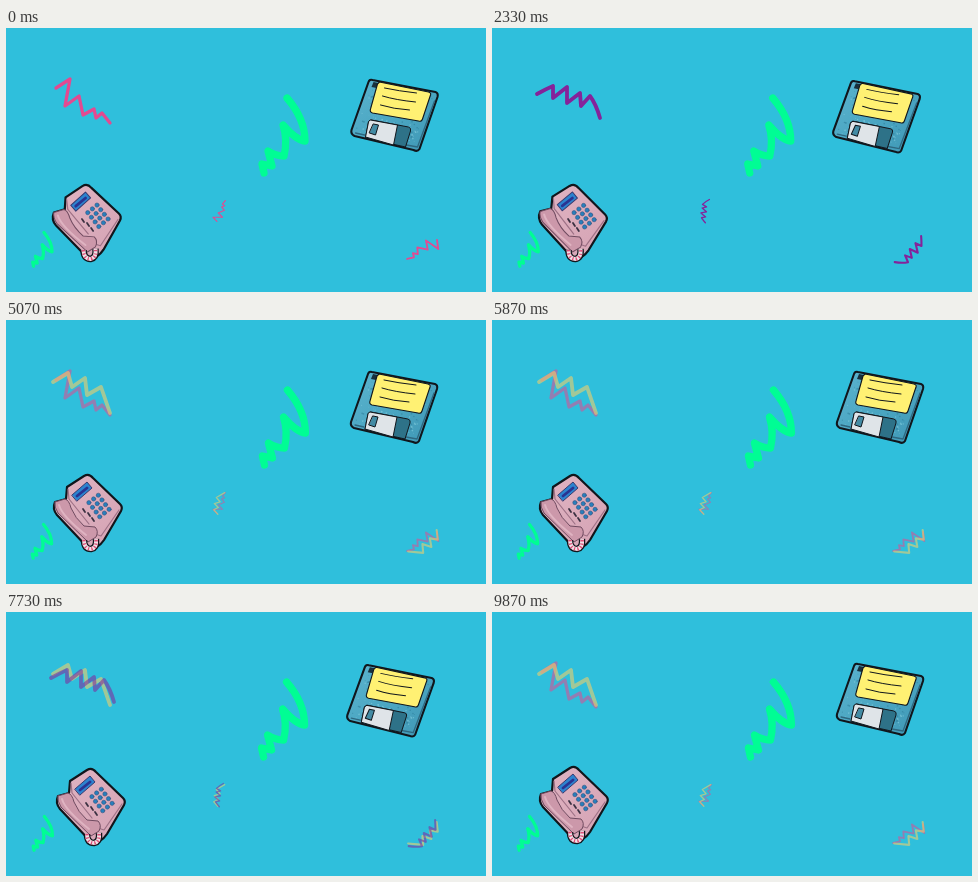
These frames come from a looping animation (480x264 px, 9.94 s). An HTML page:

```html
<!DOCTYPE html>
<html lang="en">
<head>
<meta charset="utf-8">
<title>Retro wiggle</title>
<style>
  html, body { margin: 0; width: 100%; height: 100%; overflow: hidden; background: #2fbfdc; }
  svg { display: block; width: 100vw; height: 100vh; }
  path, circle { stroke-linecap: round; stroke-linejoin: round; }
  #coil path { fill: none; stroke-linecap: butt; }
</style>
</head>
<body>
<svg viewBox="0 0 480 264">
  <defs>
    <linearGradient id="shell" x2="1" y2="1">
      <stop stop-color="#5bb4cf"/><stop offset=".55" stop-color="#4aa5c1"/><stop offset="1" stop-color="#3f97b5"/>
    </linearGradient>
    <linearGradient id="plastic" x2="1" y2="1">
      <stop stop-color="#e0b4c2"/><stop offset="1" stop-color="#d5a3b4"/>
    </linearGradient>
    <path id="zigzag" fill="none" stroke="#00fd94" stroke-width="7.3"
      d="M281 70Q299 91 299 113Q290 112 277 97Q282 112 278 128Q270 128 262 123L266 138L256 136L258 145"/>
    <g id="squiggles" fill="none" stroke-width="3.8">
      <path class="pink" stroke="#e34a91" stroke-width="3.3"
        d="M50 60L64 51L59 78L73 68L77 87L88 81L90 90L96 85L104 95"/>
      <path class="yellow" stroke="#ffd061" d="M47 62L62 53L66 67L79 58L81 75L95 67L104 93"/>
      <path class="purple" stroke="#85239a" d="M45 66Q54 61 61 58L61 70L75 59L75 75L88 65L89 78L98 68Q104 76 108 90"/>
    </g>
  </defs>

  <use href="#squiggles"/>
  <use href="#squiggles" transform="translate(215 183) rotate(-101) scale(.35) translate(-77 -77)"/>
  <use href="#squiggles" transform="translate(431 212) rotate(114.6) scale(.55) translate(-50 -60)"/>

  <g id="bigGreen"><use href="#zigzag"/></g>
  <g id="smallGreen"><use href="#zigzag" transform="translate(-88.5 173) scale(.45)"/></g>

  <g id="floppy">
    <path class="ink" fill="url(#shell)" stroke="#10161c" stroke-width="2.1"
      d="M366 52L429 64Q432 65 431 69L413 121Q411 124 407 122L348 108Q344 106 345 102L362 54Q363 51 366 52Z"/>
    <g id="specks"></g>
    <path fill="none" stroke="#2e6880" stroke-width="1.3" d="M428 73L411 119L389 115M349 105L358 107"/>
    <path fill="#18303c" d="M367 54L372 55L370 60L365 59Z"/>
    <g stroke="#10161c">
      <path fill="#fff173" stroke-width="1.1"
        d="M373 54L422 64Q425 65 424 67L416 91Q415 94 412 93L366 85Q363 84 364 81L371 56Z"/>
      <path fill="none" d="M378 60Q392 63 410 65M376 68Q389 72 409 74M374 77Q387 81 403 82"/>
      <path fill="#2e7288" d="M365 92L402 99Q405 100 404 103L399 119L359 110L362 94Z"/>
      <path fill="#dfe4e8" d="M364 92L391 97L387 117L359 109L362 94Z"/>
      <path fill="#438ba4" d="M367 96L372 97L369 107L363 105Z"/>
    </g>
  </g>

  <g id="phone">
    <path fill="url(#plastic)" stroke="#10161c" stroke-width="2.2"
      d="M61 167L78 156Q83 153 87 158L114 184Q117 187 115 191L98 220Q92 229 83 229L51 195Q46 189 49 182L60 179Z"/>
    <path fill="none" stroke="#9e7186" stroke-width="1.2" d="M113 190L95 216L89 214M62 169L63 179L83 204"/>
    <path fill="#cc98aa" stroke="#704b60"
      d="M49 182L59 179Q63 180 65 188Q69 198 78 206L89 207Q93 211 90 217L82 222L52 193Q48 187 49 182Z"/>
    <path fill="none" stroke="#dfb3c1" stroke-width="2" d="M53 185Q56 196 80 215"/>
    <path fill="#2c83cf" stroke="#383a70" d="M66 175L81 162L86 168L71 181Z"/>
    <path stroke="#293391" stroke-width="2.8" d="M71 176L81 168"/>
    <g id="keys" fill="#287fbd" stroke="#385580" stroke-width=".6"></g>
    <path stroke="#3c3142" stroke-width="1.8" d="M77 189L79 192M82 193L84 196M86 198L88 201"/>
    <g id="coil">
      <path d="M78 220Q78 229 85 229Q91 228 90 219" stroke="#10161c" stroke-width="6.5"/>
      <path d="M78 220Q78 229 85 229Q91 228 90 219" stroke="#f0dfe5" stroke-width="4"/>
      <path d="M78 220Q78 229 85 229Q91 228 90 219" stroke="#dc4f78" stroke-width="3.6" stroke-dasharray="1.3 2"/>
    </g>
  </g>
</svg>
<script>
const LOOP = 9940, STEP = 1000 / 15, CYCLE = 12;
const $ = id => document.getElementById(id);

// Pose keys: [step, x, y, angle], wrapping after CYCLE steps.
const phoneKeys = [[0, -1, 2, -1], [4, 0, 0, 0], [8, 3, 2, 0], [9, 0, 0, 0], [11, -1, 2, 1], [12, -1, 2, -1]];
const floppyKeys = [[0, .5, 0, 0], [4, 0, 0, 0], [8, -3.5, 1.5, .6], [9, -1, -.5, 0], [11, -3.5, 1.5, .6], [12, .5, 0, 0]];

const addDot = (id, x, y, r, style = '') =>
  $(id).insertAdjacentHTML('beforeend', `<circle cx="${x}" cy="${y}" r="${r}" ${style}/>`);

for (let row = 0; row < 4; row++) {
  for (let col = -1; col < 2; col++) {
    const v = row - 1.5;
    addDot('keys', 93 + 4.7 * col + 3.6 * v, 186 - 3.7 * col + 4.7 * v, 2.1);
  }
}

// Paint grain across the slanted floppy shell.
let seed = 7;
const random = () => (seed = seed * 16807 % 2147483647) / 2147483647;
for (let i = 0; i < 130; i++) {
  const u = random(), v = random();
  addDot('specks', 366 + 61 * u - 17 * v, 55 + 12 * u + 49 * v, .4 + random() * .6,
    `fill="${i % 2 ? '#86cfe0' : '#2f7f9b'}" opacity=".6"`);
}

function poseAt(keys, step) {
  const next = keys.findIndex(key => key[0] > step);
  const a = keys[next - 1], b = keys[next];
  const mix = (step - a[0]) / (b[0] - a[0]);
  return a.map((value, i) => value + (b[i] - value) * mix);
}

function place(id, keys, step, cx, cy) {
  const [, x, y, angle] = poseAt(keys, step);
  $(id).setAttribute('transform', `translate(${x} ${y}) rotate(${angle} ${cx} ${cy})`);
}

function draw(now) {
  const step = Math.floor((now % LOOP + 4) / STEP) % CYCLE;
  const shown = {
    pink: step < 4 ? 1 : step === 4 ? .55 : 0,
    yellow: step === 4 || step === 8 ? .55 : step > 4 && step < 8 ? 1 : 0,
    purple: step > 8 ? 1 : step === 8 ? .55 : 0
  };
  for (const name in shown) document.querySelector('.' + name).setAttribute('opacity', shown[name]);

  place('phone', phoneKeys, step, 82, 192);
  place('floppy', floppyKeys, step, 389, 87);
  const sway = Math.sin(step / CYCLE * 2 * Math.PI) * .5;
  $('bigGreen').setAttribute('transform', `translate(${sway} 0)`);
  $('smallGreen').setAttribute('transform', `translate(${-sway} 0)`);
}

const start = performance.now();
function tick() {
  draw(performance.now() - start);
  requestAnimationFrame(tick);
}
tick();
</script>
</body>
</html>
```
